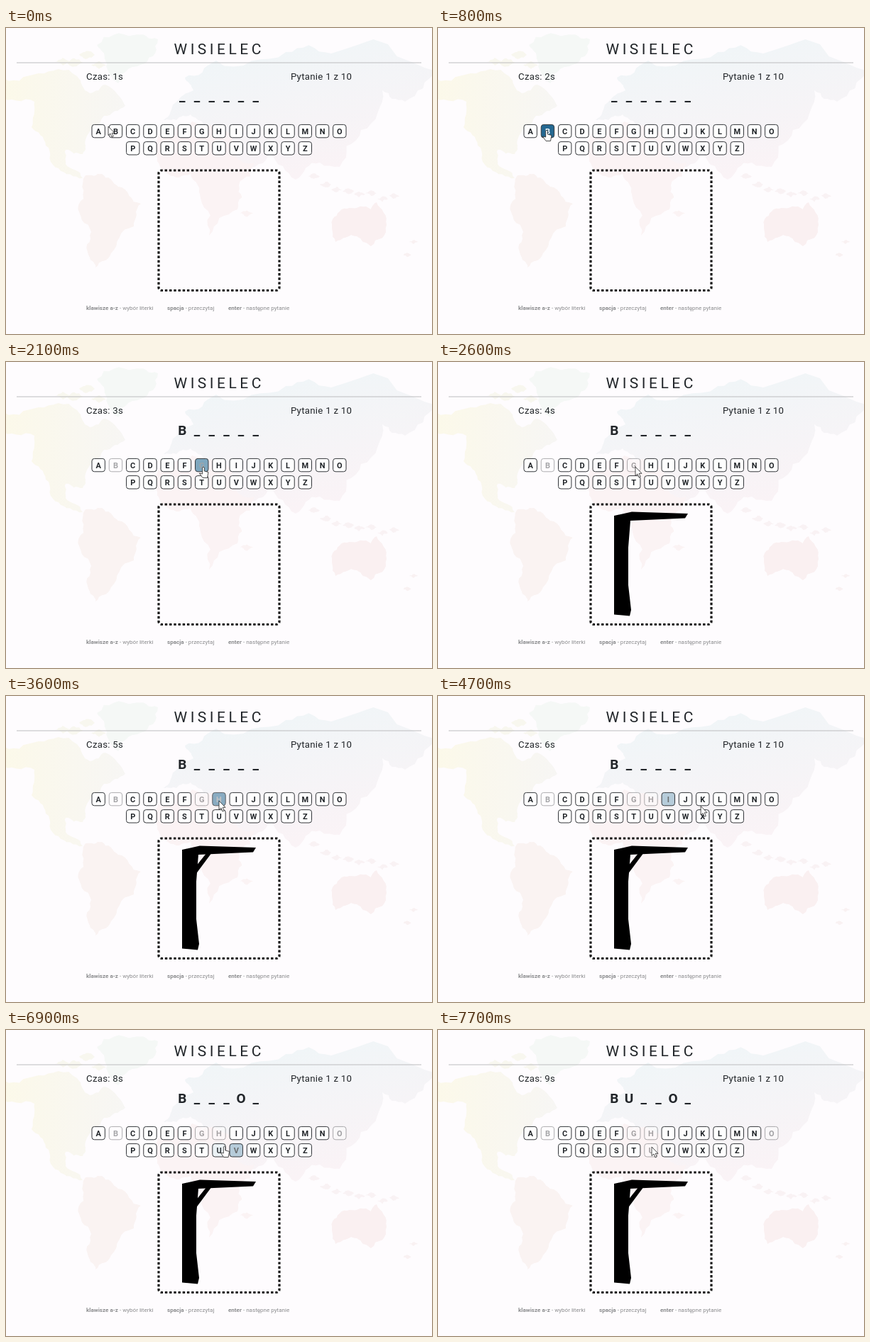
An HTML page for the animation above (8 s loop, 600 by 432 pixels).

```html
<!DOCTYPE html>
<html lang="pl">
<head>
<meta charset="utf-8">
<title>Wisielec</title>
<style>
  html, body { margin: 0; width: 100%; height: 100%; overflow: hidden; background: #fefcfe; }
  svg { display: block; width: 600px; height: 432px; font-family: Roboto, Arial, sans-serif; fill: #212529; }
  .key rect { stroke: #34373b; }
  .key text { font: bold 11px Roboto, sans-serif; text-anchor: middle; }
  #word text { font: bold 19px Roboto, sans-serif; text-anchor: middle; }
  .info { font-size: 13.2px; letter-spacing: .3px; }
  #help { font-size: 8.07px; fill: #8b8c8e; }
  #help tspan { font-weight: bold; }
  #pointer path { fill: #fff; stroke: #222; stroke-width: .8; stroke-linejoin: round; }
</style>
</head>
<body>
<svg viewBox="0 0 600 432">
  <defs>
    <linearGradient id="west"><stop stop-color="#fcf9e9"/><stop offset="1" stop-color="#f7f6f4"/></linearGradient>
    <linearGradient id="east" x2=".4" y2="1"><stop stop-color="#eef6f8"/><stop offset="1" stop-color="#faf3f6"/></linearGradient>
  </defs>
  <g id="map"></g>

  <text x="236.5" y="36.7" font-size="21" letter-spacing="4.5">WISIELEC</text>
  <path d="M15 49H585" stroke="#bcbcbe"/>
  <text id="time" class="info" x="113" y="73"></text>
  <text class="info" x="487.300" y="73" text-anchor="end">Pytanie 1 z 10</text>
  <g id="word"></g>
  <g id="keys"></g>

  <rect x="215" y="201" width="170" height="169.5" rx="4" fill="none" stroke="#151515" stroke-width="3.2"
    pathLength="216" stroke-dasharray="1.1 .9" stroke-dashoffset=".55"/>
  <path id="post" fill="#000" d="M248 217L273 211.500 352 214 348 220.500 271 224 268 262 268 315 272 350 270 358.500 248 356.500Z"/>
  <path id="brace" fill="#000" d="M267 241L283 221H290L267 252Z"/>

  <g id="help">
    <text x="113" y="398"><tspan>klawisze a-z</tspan> - wybór literki</text>
    <text x="227" y="398"><tspan>spacja</tspan> - przeczytaj</text>
    <text x="313" y="398"><tspan>enter</tspan> - następne pytanie</text>
  </g>
  <g id="pointer">
    <path id="arrow" d="M0 0V12.500L3 10 5 15 7.200 14 5.200 9.300H9Z"/>
    <path id="hand" d="M-1.300 1Q0-.6 1.300 1V6L7 7.500 5.500 15.500H-1L-5.600 9-1.300 10Z"/>
  </g>
</svg>

<script>
const LOOP = 8000, STEP = 100, FADE = 300;
const $ = id => document.getElementById(id);
const clamp = v => Math.min(1, Math.max(0, v));
const ease = k => k * k * (3 - 2 * k);
const mix = (a, b, k) => a + (b - a) * k;

function add(parent, tag, attrs, text = '') {
  const el = document.createElementNS('http://www.w3.org/2000/svg', tag);
  for (const name in attrs) el.setAttribute(name, attrs[name]);
  el.textContent = text;
  return parent.appendChild(el);
}

let seed = 7;
function random() {
  seed = seed * 16807 % 2147483647;
  return seed / 2147483647 - .5;
}

// Splits each edge at a randomly shifted midpoint to roughen a coastline.
function roughen(points) {
  return points.flatMap(([x, y], i) => {
    const [u, v] = points[(i + 1) % points.length];
    const shift = random() * .35;
    return [[x, y], [(x + u) / 2 + (v - y) * shift, (y + v) / 2 - (u - x) * shift]];
  });
}

function land(fill, outline) {
  let points = outline.split(' ').map(p => p.split(',').map(Number));
  for (let i = 0; i < 3; i++) points = roughen(points);
  add($('map'), 'polygon', { fill, points: points.join(' ') });
}

function islands(fill, count, x, y, dx, dy, size) {
  for (let i = 0; i < count; i++) {
    const cx = x + dx * i, cy = y + dy * i + random() * size * 2;
    land(fill, `${cx - size},${cy} ${cx},${cy - size / 2} ${cx + size},${cy} ${cx},${cy + size / 2}`);
  }
}

land('url(#west)', '-9,66 46,64 100,68 118,92 140,80 168,110 138,124 112,158 108,178 84,172 84,192 108,212 74,198 56,166 36,140 40,104 -9,94');
land('#f5f8f6', '128,24 180,10 214,16 196,50 158,78 142,50');
land('url(#east)', '222,130 238,106 264,88 252,70 296,46 394,34 458,36 609,62 562,104 530,88 500,144 470,196 442,190 408,214 372,176 338,207 312,148 278,136 260,122 240,130');
land('#faf3f2', '112,208 135,206 158,224 190,248 180,280 148,318 126,338 118,324 120,288 102,250');
land('#fbf3f4', '226,140 262,132 318,150 332,188 350,190 328,222 326,256 286,293 274,240 260,206 228,206 212,180');
land('#faf0f1', '460,270 484,254 514,256 522,246 536,278 514,308 494,294 464,302');
islands('#f8f7ef', 4, 80, 44, 17, 2, 11);
islands('#f9f2f4', 8, 434, 215, 16, 4, 8);
islands('#f9f1f2', 2, 574, 302, -9, 13, 6);
islands('#fbf3f4', 1, 339, 256, 0, 0, 9);

const keys = [...'ABCDEFGHIJKLMNOPQRSTUVWXYZ'].map((letter, i) => {
  const row = i < 15 ? 0 : 1;
  const x = 300 + (i - (row ? 20 : 7)) * 24.26;
  const y = 145.6 + row * 24.2;
  const group = add($('keys'), 'g', { class: 'key' });
  const box = add(group, 'rect', { x: x - 9.2, y: y - 9.2, width: 18.4, height: 18.4, rx: 3.5 });
  const label = add(group, 'text', { x, y: y + 4 }, letter);
  return { letter, x, y, group, box, label };
});

// The pointer travels to each letter, then clicks it; sag bends the way below the row.
const hops = [
  { letter: 'B', x: 153, y: 144, from: 0, to: 300, click: 900, sag: 0 },
  { letter: 'G', x: 278, y: 148, from: 1280, to: 2100, click: 2300, sag: 11 },
  { letter: 'H', x: 300, y: 148, from: 3100, to: 3400, click: 3500, sag: 0 },
  { letter: 'O', x: 467, y: 140, from: 4200, to: 5320, click: 5800, sag: 11 },
  { letter: 'U', x: 301, y: 165, from: 5950, to: 7030, click: 7300, sag: 0 }
];
const clickTime = letter => hops.find(h => h.letter === letter)?.click ?? Infinity;
for (const key of keys) key.click = clickTime(key.letter);

const cells = [...'BU  O '].map((letter, i) => ({
  letter,
  click: clickTime(letter),
  el: add($('word'), 'text', { x: 248.3 + i * 20.7, y: 102.9 })
}));

function tip(t) {
  let x = 144, y = 139;
  for (const hop of hops) {
    const k = clamp((t - hop.from) / (hop.to - hop.from));
    x = mix(x, hop.x, ease(k));
    y = mix(y, hop.y, ease(k)) + hop.sag * Math.sin(Math.PI * k);
  }
  return [x, y];
}

function isOver(key, [x, y]) {
  return Math.abs(x - key.x) < 9.4 && Math.abs(y - key.y) < 9.4;
}

// Share of the last FADE ms spent over an active key: a linear fade in and out.
function hover(key, t) {
  const samples = 12;
  let hits = 0;
  for (let k = 0; k < samples; k++) {
    const s = t - k * FADE / samples;
    if (s <= key.click && isOver(key, tip(s))) hits++;
  }
  return hits / samples;
}

function show(id, visible) {
  $(id).style.display = visible ? '' : 'none';
}

function draw(t) {
  $('time').textContent = `Czas: ${1 + Math.floor((t + 700) / 1000)}s`;
  for (const cell of cells) cell.el.textContent = t >= cell.click ? cell.letter : '_';

  const pos = tip(t);
  for (const key of keys) {
    const share = hover(key, t) * 100;
    key.box.style.fill = `color-mix(in srgb, #256891 ${share}%, #fefefe)`;
    key.label.style.fill = `color-mix(in srgb, #fff ${share}%, #212529)`;
    key.group.style.opacity = 1 - .6 * clamp((t - key.click) / FADE);
  }

  const active = keys.some(key => t < key.click && isOver(key, pos));
  show('hand', active);
  show('arrow', !active);
  show('post', t >= clickTime('G'));
  show('brace', t >= clickTime('H'));
  $('pointer').setAttribute('transform', `translate(${pos})`);
}

const start = performance.now();
function frame() {
  const t = (performance.now() - start) % LOOP;
  draw(Math.floor(t / STEP) * STEP);
  requestAnimationFrame(frame);
}
frame();
</script>
</body>
</html>
```
